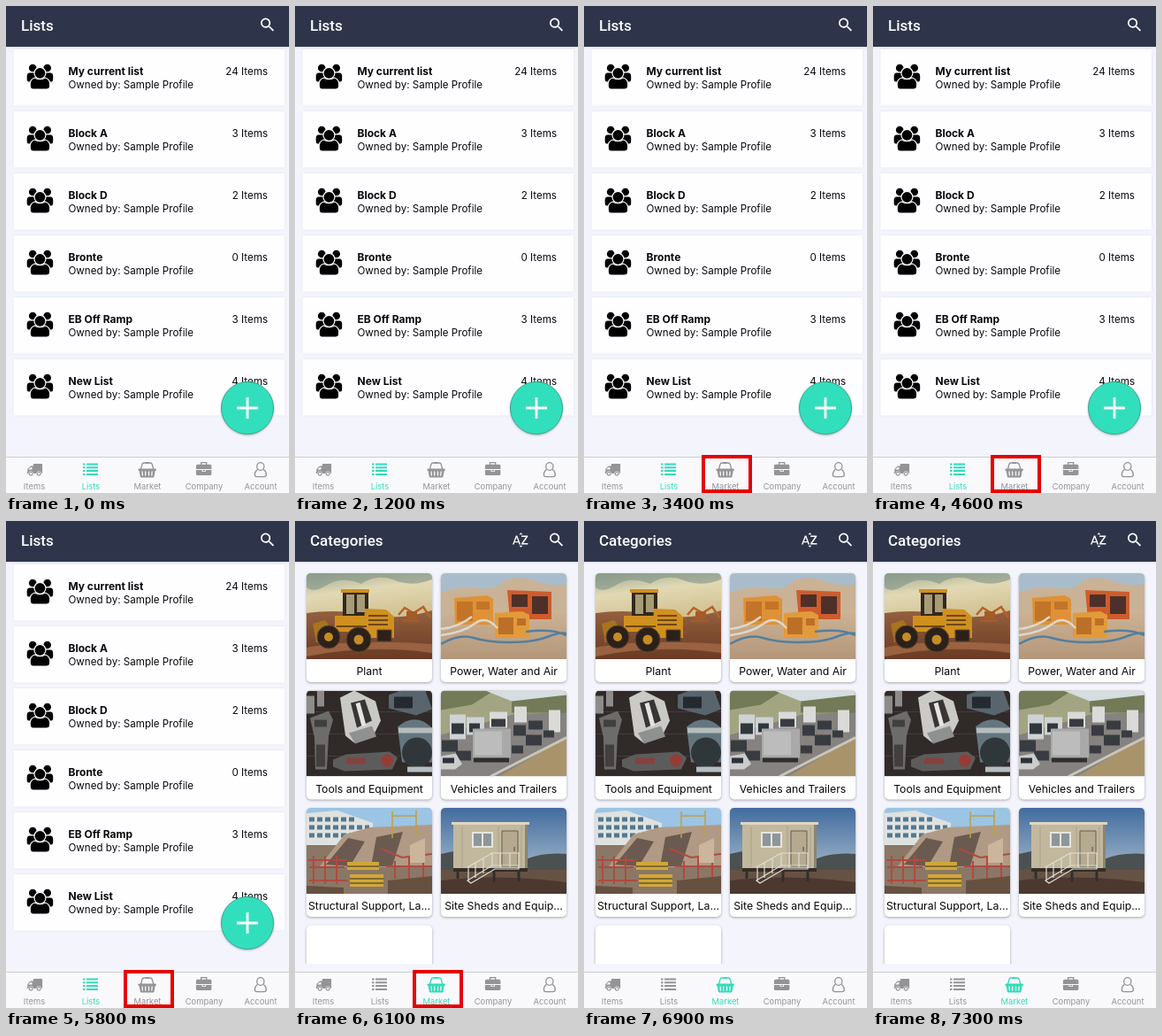
Recreate the animation shown at these times as an HTML page. Size 320 by 550 pixels, loop 7.4 s.

```html
<!DOCTYPE html>
<html lang="en">
<head>
<meta charset="utf-8">
<title>Lists and categories</title>
<style>
  html, body { margin: 0; width: 100%; height: 100%; overflow: hidden; background: #f4f5fc; }
  svg { display: block; }
  #stage { width: 320px; height: 550px; --teal: #32dcba; --grey: #949496; }
  text { font-family: Inter, "Liberation Sans", sans-serif; fill: #080808; }
  .title { font: 500 17px Roboto, sans-serif; fill: #fff; }
  .name { font-size: 12px; font-weight: 700; }
  .owner { font-size: 11.6px; }
  .count { font-size: 11.6px; text-anchor: end; }
  .label { font-size: 12.3px; text-anchor: middle; }
  .tab { color: var(--grey); }
  .tab text { font-size: 9.4px; text-anchor: middle; fill: currentColor; }
  .on { color: var(--teal); }
  .card { fill: #fff; filter: drop-shadow(0 1px 1.5px #0005); }
  .row { fill: #fefdff; filter: drop-shadow(0 0 1px #dfe1ec); }

  .before, .after, .marker { animation: 7400ms step-end infinite; }
  .before { animation-name: before; }
  .after { animation-name: after; }
  .marker { animation-name: marker; }
  @keyframes before { 0% { visibility: visible } 81.08%, 100% { visibility: hidden } }
  @keyframes after { 0% { visibility: hidden } 81.08%, 100% { visibility: visible } }
  @keyframes marker { 0% { visibility: hidden } 24.32% { visibility: visible } 87.83%, 100% { visibility: hidden } }
</style>
</head>
<body>
<svg id="stage" viewBox="0 0 320 550">
  <defs>
    <linearGradient id="shade" x2="0" y2="1"><stop stop-color="#8c90a2" stop-opacity=".5"/><stop offset="1" stop-color="#f4f5fc" stop-opacity="0"/></linearGradient>
    <linearGradient id="cloud" x2=".3" y2="1"><stop stop-color="#9aa892"/><stop offset=".4" stop-color="#e2d9b4"/><stop offset="1" stop-color="#cfbd8c"/></linearGradient>
    <linearGradient id="soil" x2="0" y2="1"><stop stop-color="#94603f"/><stop offset="1" stop-color="#6a3a24"/></linearGradient>
    <linearGradient id="sand" x2="0" y2="1"><stop stop-color="#ceb596"/><stop offset="1" stop-color="#b3967a"/></linearGradient>
    <linearGradient id="blue" x2="0" y2="1"><stop stop-color="#426c9f"/><stop offset="1" stop-color="#a9bccb"/></linearGradient>
    <clipPath id="photo"><path d="M0 97V5Q0 0 5 0H137Q142 0 142 5V97z"/></clipPath>
    <clipPath id="page"><rect y="46" width="320" height="454"/></clipPath>
    <path id="search" d="M15.5 14h-.79l-.28-.27A6.47 6.47 0 0 0 16 9.5 6.5 6.5 0 1 0 9.5 16c1.61 0 3.09-.59 4.23-1.57l.27.28v.79l5 4.99L20.49 19l-4.99-5zm-6 0C7.01 14 5 11.99 5 9.5S7.01 5 9.5 5 14 7.01 14 9.5 11.99 14 9.5 14z"/>
    <g id="people">
      <circle cx="6.5" cy="4.5" r="4.3"/><circle cx="23" cy="4.5" r="4.3"/>
      <path d="M3 10H11V20H2Q0 20 0 17V14Q0 10 3 10zM18.5 10H26.5Q29.5 10 29.5 14V17Q29.5 20 27.5 20H18.5z"/>
      <g stroke="#fff" stroke-width="1.2">
        <path d="M9 15.5Q14.7 19 20.5 15.5Q26.5 17 26 24.5Q26 28.6 22 28.6H7.5Q3.5 28.6 3.5 24.5Q3 17 9 15.5z"/>
        <circle cx="14.75" cy="10.3" r="6.5"/>
      </g>
    </g>

    <g id="icon0" fill="currentColor">
      <path d="M31.5 517h9q.6 0 .6.6V527q0 1-1 1H24.500q-.9 0-.9-1 0-.6.700-.700V523l3-3q.5-.4 1-.4h2.500V517.600q0-.6.700-.6z"/>
      <path d="M25.600 523.400v-.3l2.200-2.200h1.700v2.500z" fill="#f9f9fb"/>
      <g stroke="#f9f9fb" stroke-width=".6"><circle cx="28.200" cy="528.300" r="2.700"/><circle cx="37.200" cy="528.300" r="2.700"/></g>
      <g fill="#f9f9fb"><circle cx="28.200" cy="528.300" r="1.200"/><circle cx="37.200" cy="528.300" r="1.200"/></g>
    </g>
    <path id="icon1" d="M87 517.500h2.500m1.500 0H104M87 521.300h2.500m1.500 0H104M87 525.100h2.500m1.500 0H104M87 528.900h2.500m1.500 0H104" stroke="currentColor" stroke-width="2"/>
    <g id="icon2" fill="none" stroke="currentColor" stroke-width="1.300">
      <path d="M152.500 523l1.300-5q.5-2 2.300-2h7q1.800 0 2.300 2l1.300 5"/>
      <path d="M157.500 516h4.200" stroke-width="2"/>
      <path d="M150.500 522.600h18.300q1.100 0 1.100 1.250t-1.200 1.250L167.500 531.600q-.2 1-1.200 1H153q-1 0-1.200-1L150.600 525.100q-1.200 0-1.200-1.250t1.100-1.250z" fill="currentColor" stroke="none"/>
      <path d="M154.100 526l.3 4M157.700 526v4M161.500 526v4M165.100 526l-.3 4" stroke="#f9f9fb" stroke-linecap="round"/>
    </g>
    <g id="icon3" fill="currentColor">
      <path d="M216.500 517.700h14.300q1.600 0 1.600 1.600V523H214.900v-3.700q0-1.600 1.600-1.600zM214.900 523.900h6.600v1.600q0 .6.600.6h3.200q.6 0 .6-.6v-1.600h6.500v4.600q0 1.600-1.600 1.600H216.500q-1.600 0-1.600-1.600zM222.400 523.900h2.600v1.300h-2.600z"/>
      <path d="M220.600 518v-2.400h6.100V518" fill="none" stroke="currentColor" stroke-width="1.300"/>
    </g>
    <path id="icon4" d="M284.300 523.500C282 525 281.300 527 281.300 529.300Q281.300 531.700 284 531.700H291.500Q294.300 531.700 294.300 529.300C294.300 527 293.500 525 291.300 523.500M283.700 520a4.100 4.300 0 1 1 8.200 0a4.100 4.300 0 1 1-8.200 0z" fill="none" stroke="currentColor" stroke-width="1.300"/>

    <g id="photo0">
      <path d="M0 0h142v60H0z" fill="url(#cloud)"/>
      <path d="M0 0h142v7Q120 16 100 8T62 12Q40 3 24 13T0 16z" fill="#7f9388" opacity=".6"/>
      <path d="M0 45Q35 40 70 47T142 42V97H0z" fill="url(#soil)"/>
      <path d="M0 84Q50 74 142 80V90Q70 80 0 94z" fill="#9a6240"/>
      <path d="M104 47l7-8 10 6 11-7 8 12" fill="none" stroke="#b4622a" stroke-width="2.500"/>
      <path d="M113 43h12v8h-12zM108 52h20v3h-20z" fill="#a55b25"/>
      <path d="M7 57l14-4 8 10-3 15H11z" fill="#a8741f"/>
      <path d="M41 20h29v36H41z" fill="#33281d"/>
      <path d="M45 24h9v22h-9zM57 24h9v20h-9z" fill="#a89c76"/>
      <path d="M39 18h32v4H39zM66 40l24 1 9 8v24H64zM32 48h38v18H32z" fill="#d0901f"/>
      <path d="M70 48h22M70 53h22M70 58h22M34 60h34" stroke="#6e4818" stroke-width="2"/>
      <g fill="#2c211a" stroke="#604531"><circle cx="25" cy="72" r="13"/><circle cx="59" cy="75" r="14"/><path d="M80 64h16v13H80z"/></g>
      <circle cx="25" cy="72" r="5" fill="#c58b24"/><circle cx="59" cy="75" r="5.500" fill="#c58b24"/>
    </g>
    <g id="photo1">
      <path d="M0 0h142v40H0z" fill="#a9bccb"/>
      <path d="M0 22Q20 14 42 17T72 8Q90 2 108 9T142 12V97H0z" fill="#c9b295"/>
      <path d="M0 43Q65 36 142 42V97H0z" fill="url(#sand)"/>
      <path d="M75 19l50 2v31H78z" fill="#cf5c2c"/><path d="M80 24h18v14H80zM103 26h18v20h-18z" fill="#4d302a"/>
      <path d="M15 28l37-3 7 4v29H16z" fill="#de9136"/><path d="M18 32h18v22H18zM40 32h15v9H40z" fill="#c27528"/>
      <path d="M61 45l31-2 8 4v26H61z" fill="#e39a3a"/><path d="M65 50h17v19H65zM86 51h10v8H86z" fill="#ba7028"/>
      <g fill="none" stroke-width="2.500">
        <path d="M0 70Q25 67 38 57T64 62M0 63Q20 61 35 49" stroke="#ded7cb"/>
        <path d="M0 80Q21 68 37 73T78 78Q105 78 120 72T142 68M96 66Q125 62 142 70" stroke="#537f9e"/>
      </g>
    </g>
    <g id="photo2">
      <path d="M0 0h142v97H0z" fill="#302a29"/>
      <path d="M0 24h142M0 49h142M0 74h142" stroke="#453d39"/>
      <path d="M0 6h9v20H0zM12 0h8v18h-8z" fill="#8d8c8a"/>
      <path d="M4 31l21-8 5 10-5 18-2 38H10L9 53z" fill="#6c6c6b"/><path d="M9 33h14v8H9zM11 61h10v25H11z" fill="#41403f"/>
      <path d="M38 8l16-8 24 12 6 22-8 16-22 9-10-8z" fill="#c9c9c6"/><path d="M50 14l16-4 8 24-17 8z" fill="#393534"/><path d="M48 48l26-8 5 12-24 8z" fill="#8f9090"/><path d="M58 14l7 26" stroke="#e4e4e2" stroke-width="5"/>
      <path d="M93 5l16-6h25l8 22-18 7-31-8z" fill="#59656c"/><path d="M99 7h21v13H99z" fill="#242a30"/>
      <path d="M103 41q20-17 39 1v39h-34z" fill="#65767f"/><circle cx="125" cy="70" r="17" fill="#30373a"/><path d="M104 42h38v6h-38zM114 86h28v6h-28z" fill="#b6bdbf"/>
      <path d="M30 78l15-6 49-3 9 7-6 13-54 2-13-5z" fill="#5d5c5c"/><path d="M45 76h22v7H45z" fill="#84433d"/><circle cx="91" cy="79" r="7" fill="#943d37"/>
    </g>
    <g id="photo3">
      <path d="M0 0h142v97H0z" fill="#85827f"/>
      <path d="M0 0h142v24L82 27 0 50z" fill="#a3a582"/>
      <path d="M0 0h60L35 16 0 22zM80 9q30-10 62-4v20H80z" fill="#737a58"/>
      <path d="M50 0h92v5L80 12z" fill="#d5dde0"/>
      <path d="M142 52v45H66z" fill="#a8936b"/><path d="M56 97L142 53" stroke="#c9c5bc" stroke-width="3"/>
      <path d="M10 27h18v28H10zM29 30h20v20H29z" fill="#ced2d4"/><path d="M12 37h14v12H12zM32 37h12v10H32z" fill="#30373d"/>
      <path d="M55 24h20v18H55zM83 18h14v18H83zM122 22h13v25h-13z" fill="#dadbd8"/>
      <path d="M36 43h43v33H36z" fill="#aaa9aa"/><path d="M38 46h31v27H38z" fill="#bdbcbd"/><path d="M37 76h40v5H37z" fill="#2e2e2e"/>
      <g fill="#383c41"><path d="M1 56h18v13H1zM17 68h17v11H17zM82 39h14v12H82zM99 34h16v10H99zM96 50h18v12H96zM80 62h13v9H80zM57 32h16v9H57zM116 45h12v8h-12z"/></g>
      <path d="M0 74l17-3 7 12-8 6H0z" fill="#cbcccc"/><path d="M2 76h13v6H2z" fill="#2c3239"/>
    </g>
    <g id="photo4">
      <path d="M0 0h142v97H0z" fill="#9cc4e4"/>
      <path d="M0 6l35-3 40 14v30H0z" fill="#dfe2df"/>
      <path d="M3 13h52M3 22h68M3 31h70" stroke="#55788f" stroke-width="5" stroke-dasharray="6 3"/>
      <path d="M0 42h142v55H0z" fill="#8b7766"/>
      <path d="M14 67l29-37 29-8 70-3v48H14z" fill="#b09a85"/><path d="M22 64l25-30 19 4-17 28zM79 33l30-6-12 39H73z" fill="#6b5a4f"/>
      <path d="M97 34V4M97 9h27M124 3v29" stroke="#bda141" stroke-width="1.500"/>
      <path d="M2 59h44M3 67h40M3 82h44M8 54v32M21 54v32M34 54v32M84 46l24 10 34-4M90 66h52M100 60v20M116 56v24M132 56v22" fill="none" stroke="#b04a40" stroke-width="2"/>
      <path d="M46 61h36v9H46zM49 75h38v14H49z" fill="#cfa83a"/><path d="M46 66h36M49 80h38M49 85h38" stroke="#6b562b" stroke-width="1.500"/>
      <path d="M0 88l42 2v7H0zM92 82l50-5v20H92z" fill="#66503f"/><path d="M117 42l17-8v28h-17z" fill="#cbb59c"/>
    </g>
    <g id="photo5">
      <path d="M0 0h142v78H0z" fill="url(#blue)"/>
      <path d="M0 52l14-3v28H0zM96 58q20-8 46-6v27H96z" fill="#4a5150"/>
      <path d="M0 70h142v27H0z" fill="#665244"/><path d="M0 82q65-8 142 2v13H0z" fill="#4b392f"/>
      <path d="M14 18h84v50H14z" fill="#c2b89e"/>
      <path d="M12 16h88v3H12z" fill="#ddd6c2"/><path d="M95 19h3v49h-3z" fill="#8d8470"/>
      <path d="M24 21v46M65 21v46M91 21v46" stroke="#aca28b"/>
      <path d="M35 27h24v18H35z" fill="#e6e5dc"/><path d="M37 29h9v14h-9zM48 29h9v14h-9z" fill="#8d969a"/>
      <path d="M69 26h18v40H69z" fill="#b5aa90" stroke="#655e50"/><path d="M83 44v5" stroke="#444"/>
      <path d="M14 68h84v4H14z" fill="#352d27"/>
      <path d="M30 82l28-17h30v4H61L34 85zM30 67l28-16h31M31 67v16M39 62v17M48 57v17M58 51v15M67 51v16M78 51v16M88 51v17" fill="none" stroke="#e0ded4" stroke-width="1.200"/>
      <path d="M19 72v8M60 72v12M88 72v11" stroke="#302f2b" stroke-width="3"/>
    </g>
  </defs>

  <rect width="320" height="550" fill="#f4f5fc"/>
  <g id="lists" class="before"></g>
  <g id="cats" class="after" clip-path="url(#page)"></g>

  <rect y="45" width="320" height="4" fill="url(#shade)"/>
  <rect width="320" height="46" fill="#2e354b"/>
  <text class="title before" x="17" y="28">Lists</text>
  <g class="after" fill="#fff">
    <text class="title" x="17" y="28">Categories</text>
    <path transform="translate(244.6 11.2) scale(.86)" d="M14.94 4.66h-4.72l2.36-2.36zm-4.69 14.71h4.66l-2.33 2.33zM6.1 6.27L1.6 17.73h1.84l.92-2.45h5.11l.92 2.45h1.84L7.74 6.27H6.1zm-1.13 7.37l1.94-5.18 1.94 5.18H4.97zm10.76 2.5h6.12v1.59h-8.53v-1.29l5.92-8.56h-5.88v-1.6h8.3v1.26l-5.93 8.6z"/>
  </g>
  <use href="#search" transform="translate(285.4 11) scale(.86)" fill="#fff"/>

  <g class="before">
    <circle cx="273" cy="454" r="29.500" fill="#32dfbc" stroke="#36a895" style="filter:drop-shadow(0 1px 1px #0004)"/>
    <path d="M261 454h24M273 442v24" stroke="#fff" stroke-width="2.800"/>
  </g>

  <rect y="509" width="320" height="41" fill="#f9f9fb"/>
  <path d="M0 509.500h320" stroke="#cdcdd2"/>
  <g id="tabs"></g>
  <rect class="marker" x="135" y="509" width="53" height="39" fill="none" stroke="#e60000" stroke-width="4"/>
</svg>

<script>
  const rows = [["My current list", 24], ["Block A", 3], ["Block D", 2], ["Bronte", 0], ["EB Off Ramp", 3], ["New List", 4]];
  const cats = ["Plant", "Power, Water and Air", "Tools and Equipment", "Vehicles and Trailers",
    "Structural Support, La...", "Site Sheds and Equip..."];
  const tabs = ["Items", "Lists", "Market", "Company", "Account"];
  const fill = (id, html) => document.getElementById(id).innerHTML = html;

  fill("lists", rows.map(([name, count], i) => `
    <g transform="translate(0 ${49 + 70 * i})">
      <rect class="row" x="8.5" width="306.5" height="63.5"/>
      <use href="#people" x="23.7" y="16.5"/>
      <text class="name" x="70.5" y="28.5">${name}</text>
      <text class="owner" x="70.5" y="43.5">Owned by: Sample Profile</text>
      <text class="count" x="296" y="28.5">${count} Items</text>
    </g>`).join(""));

  const card = i => `<g transform="translate(${13 + i % 2 * 152} ${59 + (i >> 1) * 132.5})">
    <rect class="card" width="142" height="123" rx="5"/>`;
  fill("cats", cats.map((label, i) => `${card(i)}
      <g clip-path="url(#photo)"><use href="#photo${i}"/></g>
      <text class="label" x="71" y="115">${label}</text>
    </g>`).join("") + card(6) + "</g>");

  const tab = (i, cls) => `<g class="tab ${cls}"><use href="#icon${i}"/><text x="${32 + 64 * i}" y="546">${tabs[i]}</text></g>`;
  fill("tabs", tabs.map((_, i) =>
    i === 1 ? tab(i, "on before") + tab(i, "after") :
    i === 2 ? tab(i, "before") + tab(i, "on after") : tab(i, "")).join(""));
</script>
</body>
</html>
```
